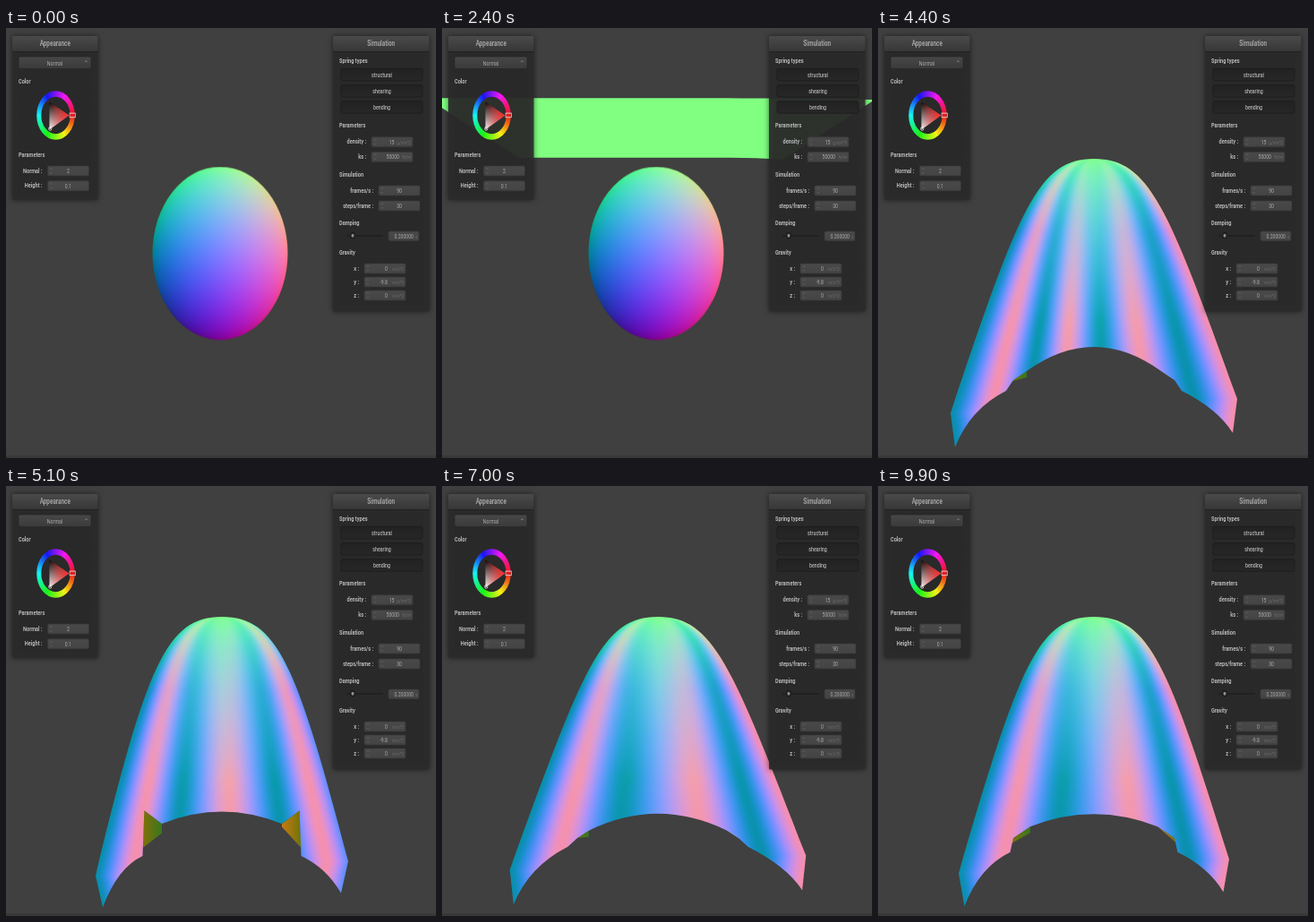
An HTML page with a canvas that plays this animation: 480 by 480 pixels, repeating every 10 s.

```html
<!DOCTYPE html>
<html lang="en">
<head>
<meta charset="utf-8">
<title>Cloth simulation</title>
<style>
html, body { margin: 0; width: 100%; height: 100%; overflow: hidden; background: #404040; }
canvas, svg { position: absolute; left: 0; top: 0; width: 480px; height: 480px; }
text { font-family: Roboto, "Open Sans", sans-serif; }
</style>
</head>
<body>
<canvas id="scene" width="480" height="480"></canvas>
<canvas id="ui" width="480" height="480"></canvas>
<svg id="labels" viewBox="0 0 480 480"></svg>
<script>
const SQUEEZE = 0.78, LOOP = 10000, STEP = 100;
const LAND = 2600, DRAPE = 3400, HANG = 4400, CLOSE = 5800;
const scene = document.getElementById('scene').getContext('2d');
const ui = document.getElementById('ui').getContext('2d');
const mix = (a, b, p) => a + (b - a) * p;
const blend = (a, b, p) => a.map((v, i) => mix(v, b[i], p));
const clamp = p => Math.min(1, Math.max(0, p));
const smooth = p => p * p * (3 - 2 * p);

// Left half of the cloth; the right half is its mirror image. Order:
// axis, apex y, knee, edge, | lift of the right corner, hem centre y,
// corner, flare, pleat, inner, | notch, droop of the inner flap.
const UPPER = 6, FLAP = 16;
const TENT = [241, 146, 100, 240, -12, 297, 4, 314, -20, 314, 60, 322, 122, 313, 205, 295, 160, 320, 0];
const WIDE = [241, 146, 158, 200, 81, 430, 16, 366, 86, 468, 103, 425, 143, 405, 166, 383, 151, 393, 7];
const OPEN = [241, 146, 156, 200, 119, 440, 16, 367, 130, 473, 146, 427, 162, 421, 182, 371, 168, 238, 25];

// Free fall of the flat sheet: far edge below, near edge above.
function flat(t) {
  const far = -28 + 30 * (t / 1000) ** 2;
  const near = 240 - (240 - far) * 1.7;
  const hem = k => [86 + 147 * k, far];
  return [233, near, 60, near, -17, near, -2, far, ...hem(0), ...hem(0.2), ...hem(0.4), ...hem(0.8), ...hem(0.6), 0];
}

// Damped swing of the hanging cloth: 0 is wide, 1 folded together.
function swing(t) {
  if (t < CLOSE) return smooth((t - HANG) / (CLOSE - HANG));
  const dt = t - CLOSE;
  return 0.13 + 0.87 * Math.exp(-dt / 2500) * Math.cos(dt / 3600 * 2 * Math.PI);
}

const calm = t => clamp((t - HANG) / 1000);

function hanging(t) {
  const s = swing(t), open = smooth(clamp((s - 0.3) / 0.7));
  const pose = WIDE.map((v, i) => mix(v, OPEN[i], i < FLAP ? s : open));
  pose[7] -= 10 * (1 - calm(t));
  return pose;
}

// Folds: half waves, shift, pinch, lean, upward tilt, depth.
const FLAT_FOLDS = [8.5, 0.06, 0, 0, 1, 0];
const TENT_FOLDS = [8.5, 0.06, 0, 0, 0.6, 0.75];
const HANG_FOLDS = [7, 0, 0, 0.05, 0.12, 0.93];
const SKIRT_FOLDS = [5, 0, 0.06, 0, 0.12, 0.93];

function clothAt(t) {
  if (t <= LAND) return [flat(t), FLAT_FOLDS];
  if (t <= DRAPE) {
    const p = (t * t - LAND * LAND) / (DRAPE * DRAPE - LAND * LAND);
    // The upper outline settles ahead of the hem.
    const pose = flat(LAND).map((v, i) => mix(v, TENT[i], i < UPPER ? p ** 0.55 : p));
    return [pose, blend(FLAT_FOLDS, TENT_FOLDS, p)];
  }
  if (t <= HANG) {
    const p = 1 - (1 - (t - DRAPE) / (HANG - DRAPE)) ** 1.7;
    return [blend(TENT, hanging(HANG), p), blend(TENT_FOLDS, HANG_FOLDS, p)];
  }
  return [hanging(t), blend(HANG_FOLDS, SKIRT_FOLDS, calm(t))];
}

function half(pose, mirrored) {
  const [axis, apexY] = pose;
  const lift = mirrored ? pose[6] : 0;
  const at = (i, dy = 0) => [mirrored ? 2 * axis - pose[i] : pose[i], pose[i + 1] - dy];
  return {
    apex: [axis, apexY],
    shoulder: [axis + (mirrored ? 62 : -62), apexY],
    knee: at(2), edge: at(4, lift), corner: at(8, lift),
    flare: at(10), pleat: at(12), inner: at(14), notch: at(16)
  };
}

function outline(l, r, centerY) {
  const path = new Path2D();
  path.moveTo(...l.apex);
  path.bezierCurveTo(...l.shoulder, ...l.knee, ...l.edge);
  path.lineTo(...l.corner);
  path.quadraticCurveTo(...l.flare, ...l.pleat);
  path.lineTo(...l.notch);
  path.lineTo(...l.inner);
  path.quadraticCurveTo((l.inner[0] + r.inner[0]) / 2, 2 * centerY - l.inner[1], ...r.inner);
  path.lineTo(...r.notch);
  path.lineTo(...r.pleat);
  path.quadraticCurveTo(...r.flare, ...r.corner);
  path.lineTo(...r.edge);
  path.bezierCurveTo(...r.knee, ...r.shoulder, ...r.apex);
  return path;
}

function sideCurve({ apex, shoulder, knee, edge, corner }) {
  const pts = [];
  for (let i = 0; i <= 24; i++) {
    const p = i / 24, q = 1 - p;
    pts.push([0, 1].map(k => q ** 3 * apex[k] + 3 * q * q * p * shoulder[k] + 3 * q * p * p * knee[k] + p ** 3 * edge[k]));
  }
  return [...pts, corner];
}

function edgeX(pts, y) {
  for (let i = 1; i < pts.length; i++) {
    const [x0, y0] = pts[i - 1], [x1, y1] = pts[i];
    if (y <= y1 && y1 > y0) return mix(x0, x1, clamp((y - y0) / (y1 - y0)));
  }
  return pts[pts.length - 1][0];
}

// Surface normal at u across and v down the cloth.
function clothNormal(u, v, [waves, shift, pinch, lean, tilt, depth]) {
  const side = Math.abs(2 * u - 1);
  const phase = u + pinch * Math.sin(2 * Math.PI * u) + lean * Math.sin(Math.PI * u) ** 2 - shift;
  const amp = depth * mix(side, 1, Math.min(1, v * 1.8));
  const ny = tilt + (1 - tilt) * (1 - v) ** 2 * (1 - side * Math.min(1, v * 4));
  const nx = -Math.cos(Math.PI * waves * phase) * amp * Math.sqrt(1 - ny * ny);
  return [nx, ny, Math.sqrt(Math.max(0, 1 - nx * nx - ny * ny))];
}

const shade = n => n.map(c => 127.5 * (c + 1));

const CELL = 2, GRID = 480 / CELL;
const fabric = document.createElement('canvas');
fabric.width = fabric.height = GRID;
const fabricCtx = fabric.getContext('2d');
const fabricImg = fabricCtx.createImageData(GRID, GRID);

function paintFabric(l, r, folds) {
  const lc = sideCurve(l), rc = sideCurve(r);
  const top = l.apex[1], bottom = Math.max(l.corner[1], l.pleat[1]) + 3;
  for (let j = 0; j < GRID; j++) {
    const y = (j + 0.5) * CELL, v = clamp((y - top) / (bottom - top));
    const x0 = edgeX(lc, y), x1 = Math.max(x0 + 1, edgeX(rc, y));
    for (let i = 0; i < GRID; i++) {
      const u = clamp(((i + 0.5) * CELL - x0) / (x1 - x0));
      const o = (j * GRID + i) * 4;
      const rgb = shade(clothNormal(u, v, folds));
      for (let k = 0; k < 3; k++) fabricImg.data[o + k] = rgb[k];
      fabricImg.data[o + 3] = 255;
    }
  }
  fabricCtx.putImageData(fabricImg, 0, 0);
}

function drawFlap({ notch, inner, pleat }, droop, from, to) {
  const pts = [notch, inner, [inner[0], inner[1] + droop], [pleat[0], pleat[1] - 9]];
  const xs = pts.map(p => p[0]);
  const g = scene.createLinearGradient(Math.min(...xs), 0, Math.max(...xs) + 0.1, 0);
  g.addColorStop(0, from);
  g.addColorStop(1, to);
  scene.fillStyle = g;
  scene.beginPath();
  pts.forEach(p => scene.lineTo(...p));
  scene.fill();
}

function drawCloth(t) {
  const [pose, folds] = clothAt(t);
  const l = half(pose, false), r = half(pose, true);
  const droop = pose[pose.length - 1];
  if (droop) {
    drawFlap(l, droop, '#84700a', '#37781c');
    drawFlap(r, droop - 7, '#c77a12', '#6c7408');
  }
  paintFabric(l, r, folds);
  scene.save();
  scene.clip(outline(l, r, pose[7]));
  scene.drawImage(fabric, 0, 0, 480, 480);
  scene.restore();
}

// Ball coloured by its surface normal.
const ball = document.createElement('canvas');
ball.width = 152; ball.height = 194;
(function paintBall() {
  const c = ball.getContext('2d'), img = c.createImageData(152, 194);
  for (let y = 0; y < 194; y++) for (let x = 0; x < 152; x++) {
    let nx = (x + 0.5 - 76) / 75.5, ny = (97 - y - 0.5) / 96.5;
    const d = Math.max(1, Math.hypot(nx, ny));
    nx /= d; ny /= d;
    const nz = Math.sqrt(Math.max(0, 1 - nx * nx - ny * ny));
    img.data.set([...shade([nx, ny, nz]), 255], (y * 152 + x) * 4);
  }
  c.putImageData(img, 0, 0);
  c.globalCompositeOperation = 'destination-in';
  c.beginPath();
  c.ellipse(76, 97, 75.5, 96.5, 0, 0, 7);
  c.fill();
})();

// Static panels
function box(x, y, w, h, c0, c1 = c0, r = 1.5, line) {
  const g = ui.createLinearGradient(0, y, 0, y + h);
  g.addColorStop(0, c0);
  g.addColorStop(1, c1);
  ui.fillStyle = g;
  ui.beginPath();
  ui.roundRect(x, y, w, h, r);
  ui.fill();
  if (line) { ui.strokeStyle = line; ui.lineWidth = 0.7; ui.stroke(); }
}

function label(str, x, y, anchor = 'start', size = 7.2, fill = '#b8b8b8', weight = 700) {
  const el = document.createElementNS('http://www.w3.org/2000/svg', 'text');
  el.textContent = str;
  const attrs = { transform: `translate(${x} ${y}) scale(${SQUEEZE} 1)`,
    'text-anchor': anchor, 'font-size': size, fill, 'font-weight': weight };
  for (const k in attrs) el.setAttribute(k, attrs[k]);
  document.getElementById('labels').append(el);
}

function panel(title, x, w, h) {
  ui.save();
  ui.shadowColor = 'rgba(0,0,0,.6)';
  ui.shadowBlur = 6;
  box(x, 9, w, h, 'rgba(43,43,43,.91)');
  ui.restore();
  box(x, 9, w, 17, '#4a4a4a', '#373737');
  ui.fillStyle = '#202020';
  ui.fillRect(x, 26, w, 0.8);
  label(title, x + w / 2, 20.2, 'middle', 8.2, '#a2a2a2');
}

function chevron(x, y, d) {
  ui.beginPath();
  ui.moveTo(x - 1.3, y);
  ui.lineTo(x, y + d);
  ui.lineTo(x + 1.3, y);
  ui.stroke();
}

function field(name, x, y, value, valueX, unit) {
  box(x, y, 46, 11, '#494949', '#444', 1.5, '#383838');
  ui.strokeStyle = '#6a6a6a';
  ui.lineWidth = 0.6;
  chevron(x + 4, y + 4, -1.5);
  chevron(x + 4, y + 7, 1.5);
  label(name, x - 6, y + 7.6, 'end');
  label(value, valueX, y + 8, 'end', 6.6, '#aaa', 400);
  if (unit) label(unit, x + 44, y + 8, 'end', 6, '#6c6c6c', 400);
}

function wheel() {
  ui.save();
  ui.translate(55.5, 97.4);
  ui.scale(SQUEEZE, 1);
  const hue = ui.createConicGradient(0, 0, 0);
  for (let i = 0; i <= 12; i++) hue.addColorStop(i / 12, `hsl(${i * 30} 90% 52%)`);
  ui.beginPath();
  ui.arc(0, 0, 24, 0, 7);
  ui.strokeStyle = hue;
  ui.lineWidth = 6.5;
  ui.stroke();
  const gray = ui.createLinearGradient(0, -15, 0, 16);
  gray.addColorStop(0, '#000');
  gray.addColorStop(1, '#fff');
  const red = ui.createLinearGradient(-10, 0, 19, 0);
  red.addColorStop(0, 'rgba(255,40,40,0)');
  red.addColorStop(1, 'rgb(255,40,40)');
  ui.beginPath();
  ui.moveTo(19, 0);
  ui.lineTo(-9, -15);
  ui.lineTo(-9, 16);
  ui.closePath();
  for (const g of [gray, red]) { ui.fillStyle = g; ui.fill(); }
  ui.strokeStyle = '#ddd';
  ui.lineWidth = 1;
  ui.beginPath();
  ui.arc(-8, 15, 2, 0, 7);
  ui.stroke();
  ui.strokeStyle = '#e6c8c8';
  ui.strokeRect(20, -2.3, 8, 4.6);
  ui.restore();
}

panel('Appearance', 7, 95.5, 183);
box(14, 32, 81, 13.5, '#474747', '#3b3b3b', 2, '#262626');
label('Normal', 54.5, 41.5, 'middle', 6.8, '#aaa', 400);
ui.strokeStyle = '#999';
ui.lineWidth = 0.7;
chevron(89.5, 38, -1.5);
label('Color', 14, 62);
wheel();
label('Parameters', 14, 143.5);
field('Normal :', 46.5, 154, '2', 71);
field('Height :', 46.5, 170.8, '0.1', 73);

panel('Simulation', 365, 107.5, 307.5);
label('Spring types', 372, 39);
['structural', 'shearing', 'bending'].forEach((name, i) => {
  const y = 45.3 + 18.2 * i;
  box(374, y, 91, 13.5, '#222', '#272727', 2, '#1a1a1a');
  label(name, 419.5, y + 9.3, 'middle', 6.8, '#b4b4b4', 500);
});
label('Parameters', 372, 111);
field('density :', 408, 121.8, '15', 433.5, 'g/cm^2');
field('ks :', 408, 138.4, '50000', 439, 'N/m');
label('Simulation', 372, 165.5);
field('frames/s :', 416, 176, '90', 442);
field('steps/frame :', 416, 193, '30', 442);
label('Damping', 372, 220);
box(380, 231, 41, 1.8, '#222', '#1d1d1d', 1);
for (const [r, fill] of [[3.8, '#1c1c1c'], [2, '#8e8e8e']]) {
  ui.fillStyle = fill;
  ui.beginPath();
  ui.ellipse(387, 231.8, r * SQUEEZE, r, 0, 0, 7);
  ui.fill();
}
box(427, 227, 34, 10.5, '#494949', '#444', 1.5, '#383838');
label('0.200000', 455, 234.8, 'end', 6.6, '#aaa', 400);
label('s', 459.5, 234.8, 'end', 6, '#6c6c6c', 400);
label('Gravity', 372, 253);
['0', '-9.8', '0'].forEach((g, i) => field('xyz'[i] + ' :', 400, 263 + 15 * i, g, 426, 'm/s^2'));

const start = performance.now();
let shown = -1;
function draw() {
  const t = Math.floor((performance.now() - start) % LOOP / STEP) * STEP;
  if (t !== shown) {
    shown = t;
    scene.fillStyle = '#404040';
    scene.fillRect(0, 0, 480, 480);
    scene.fillStyle = '#3a3838';
    scene.fillRect(0, 477, 480, 3);
    scene.drawImage(ball, 163, 154.5);
    drawCloth(t);
  }
  requestAnimationFrame(draw);
}
draw();
</script>
</body>
</html>
```
